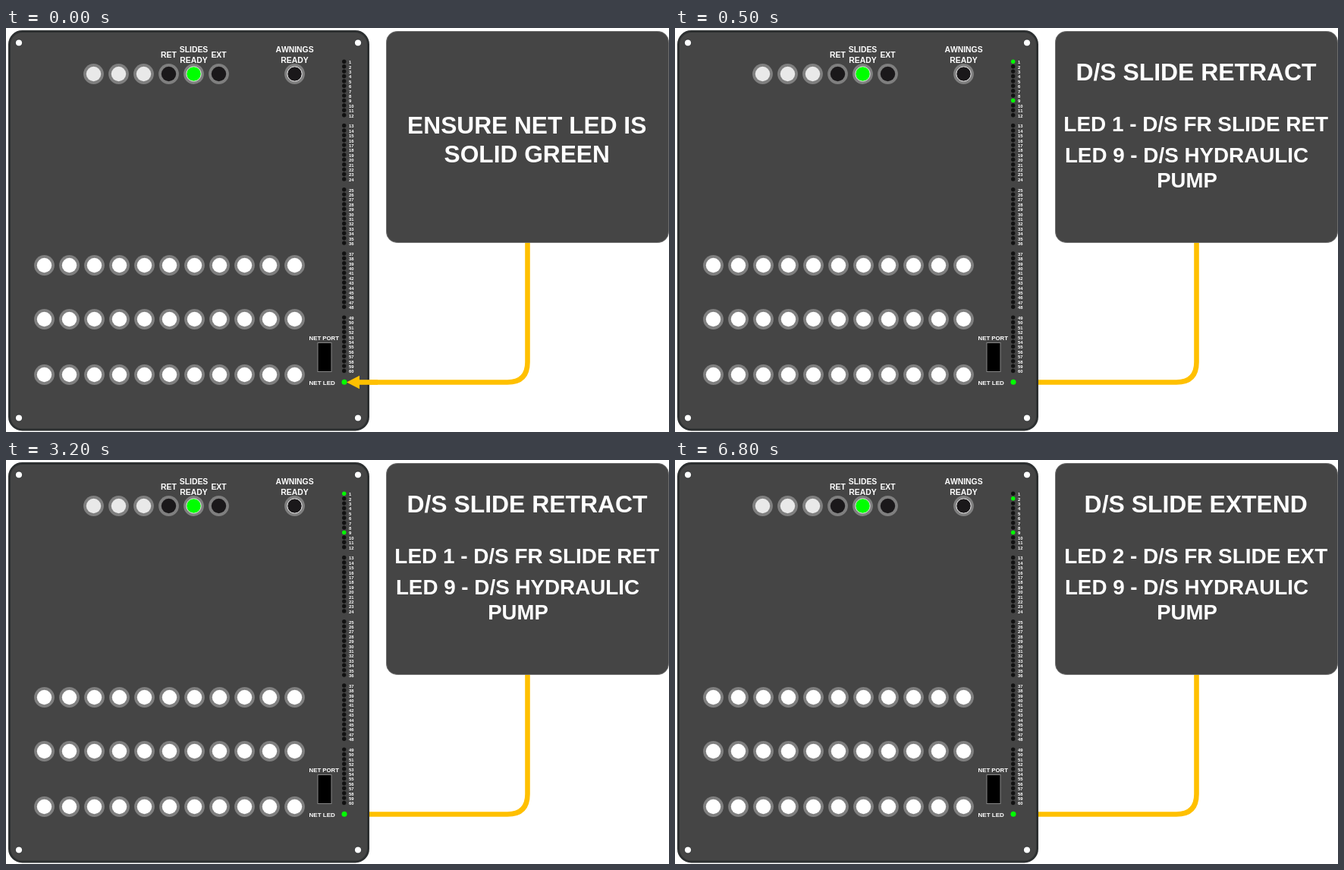
These frames come from a looping animation (874x532 px, 8000 ms). An HTML page:

```html
<!DOCTYPE html>
<html lang="en">
<head>
<meta charset="utf-8">
<title>Slide controller LEDs</title>
<style>
  html, body { margin: 0; width: 100%; height: 100%; overflow: hidden; background: #fff; }
  svg { display: block; width: 874px; height: 532px; }
  text { font-family: "Liberation Sans", Arial, sans-serif; font-weight: bold; font-kerning: none; fill: #fff; }
</style>
</head>
<body>
<svg id="stage" viewBox="0 0 874 532"></svg>
<script>
const stage = document.getElementById('stage');
const GREEN = '#00ff00', ORANGE = '#ffc000', PANEL = '#454545';

function add(tag, attrs, parent = stage) {
  const node = document.createElementNS('http://www.w3.org/2000/svg', tag);
  for (const key in attrs) node.setAttribute(key, attrs[key]);
  return parent.appendChild(node);
}
const circle = (cx, cy, r, fill, more) => add('circle', { cx, cy, r, fill, ...more });

function label(text, x, y, size, anchor = 'middle', parent = stage) {
  add('text', { x, y, 'font-size': size, 'text-anchor': anchor }, parent).textContent = text;
}

function button(x, y, fill, rim) {
  circle(x, y, 13.4, '#7f7f7f');
  circle(x, y, 9.7, fill, rim ? { stroke: rim, 'stroke-width': 1 } : {});
}

// Cable, partly covered by the controller panel
add('path', {
  d: 'M687.5 282V440Q687.5 466.5 661 466.5H470',
  fill: 'none', stroke: ORANGE, 'stroke-width': 6.6
});

// Panels
add('rect', { x: 4.5, y: 4.5, width: 473, height: 524.5, rx: 17, fill: PANEL, stroke: '#2d3031', 'stroke-width': 3 });
add('rect', { x: 501.5, y: 4.5, width: 372, height: 278, rx: 14, fill: PANEL, stroke: '#6c6c6c', 'stroke-width': 1 });
for (const [x, y] of [[17, 19.5], [464, 19.5], [17, 513.5], [464, 513.5]])
  circle(x, y, 4.6, '#fff', { stroke: '#2d3031', 'stroke-width': 1 });

// Buttons
for (const x of [115.5, 148.5, 181.5]) button(x, 60.5, '#e9e9e9');
button(214.5, 60.5, '#1a181a');
button(247.5, 60.5, GREEN, '#e4e4e4');
button(280.5, 60.5, '#1a181a');
button(380.5, 60.5, '#1a181a', '#f0f0f0');
for (const y of [312.5, 383.5, 456.5])
  for (let i = 0; i < 11; i++) button(50.5 + 33 * i, y, '#fff');

// Fixed labels and port
label('RET', 214.5, 39, 10.4);
label('SLIDES', 247.5, 32, 10.4);
label('READY', 247.5, 46, 10.4);
label('EXT', 280.5, 39, 10.4);
label('AWNINGS', 380.5, 32, 10.4);
label('READY', 380.5, 46, 10.4);
label('NET PORT', 419.3, 411, 7.8);
label('NET LED', 416.7, 470, 8);
add('rect', { x: 411, y: 414.5, width: 18, height: 38, fill: '#000', stroke: '#858585', 'stroke-width': 1 });

// Five groups of twelve numbered LEDs
const leds = [];
for (let n = 0; n < 60; n++) {
  const y = 44.3 + Math.floor(n / 12) * 84.2 + (n % 12) * 6.4;
  leds.push(circle(445.7, y, 2.7, '#111'));
  label(n + 1, 452, y + 2.8, 5.8, 'start');
}
circle(446, 466.3, 3.5, GREEN);

// Steps: start time, lit LEDs, lines of text as [text, x, baseline, size]
const pump = [['LED 9 - D/S HYDRAULIC', 674.5, 177, 27.8], ['PUMP', 675, 210, 27.5]];
const steps = [
  { start: 0, lit: [], arrow: true, lines: [
    ['ENSURE NET LED IS', 686.7, 139, 31.7], ['SOLID GREEN', 686.7, 177, 31.7]] },
  { start: 500, lit: [1, 9], lines: [
    ['D/S SLIDE RETRACT', 687, 69, 31.9], ['LED 1 - D/S FR SLIDE RET', 686.7, 136, 27.9], ...pump] },
  { start: 5000, lit: [2, 9], lines: [
    ['D/S SLIDE EXTEND', 686.7, 69, 31.9], ['LED 2 - D/S FR SLIDE EXT', 686.7, 136, 27.9], ...pump] }
];
for (const step of steps) {
  step.group = add('g', {});
  if (step.arrow) {
    add('path', { d: 'M490 466.5H464', stroke: ORANGE, 'stroke-width': 6.6 }, step.group);
    add('path', { d: 'M449 466.5L466 457.8V475.2Z', fill: ORANGE }, step.group);
  }
  for (const [text, x, y, size] of step.lines) label(text, x, y, size, 'middle', step.group);
}

const LOOP = 8000, begin = performance.now();
let shown;
function draw() {
  const time = (performance.now() - begin) % LOOP;
  const current = steps.findLast(step => time >= step.start);
  if (current !== shown) {
    shown = current;
    for (const step of steps) step.group.style.display = step === current ? '' : 'none';
    leds.forEach((led, i) => led.setAttribute('fill', current.lit.includes(i + 1) ? GREEN : '#111'));
  }
  requestAnimationFrame(draw);
}
draw();
</script>
</body>
</html>
```
